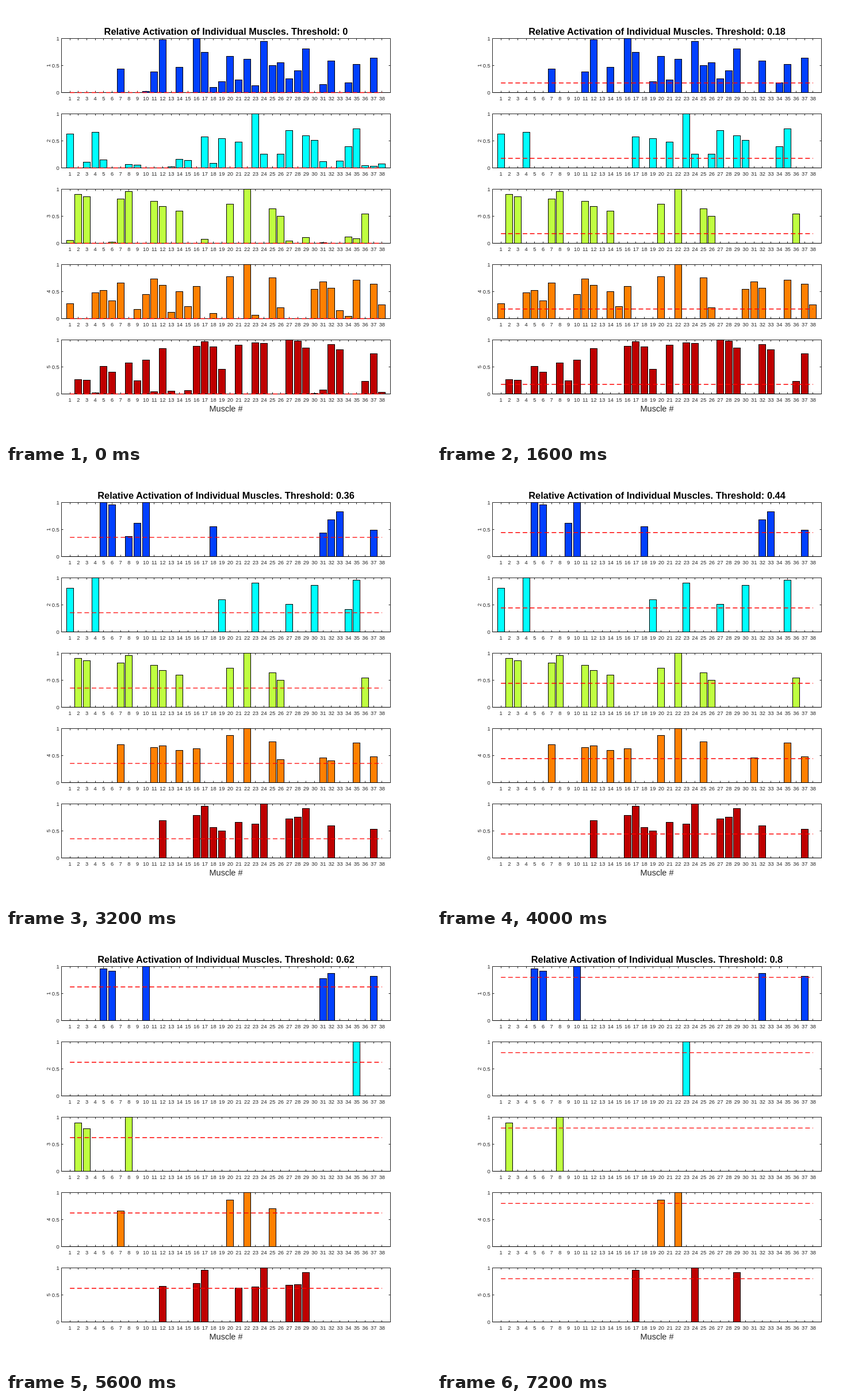
Recreate the animation shown at these times as an HTML page. Size 739 px wide and 758 px high, loop 8000 ms.

```html
<!DOCTYPE html>
<html lang="en">
<head>
<meta charset="utf-8">
<title>Muscle activation by threshold</title>
<style>
  html, body { margin: 0; width: 100%; height: 100%; overflow: hidden; background: #fff; }
  svg { display: block; width: 739px; height: 758px; font-family: Arial, "Liberation Sans", sans-serif; }
  text { fill: #262626; text-anchor: middle; font-size: 9.33px; }
  .title { fill: #000; font-size: 16.4px; font-weight: bold; }
  .axis { fill: none; stroke: #262626; }
  .bar { stroke: #000; }
  .limit { stroke: #f00; stroke-width: 1.35; stroke-dasharray: 8 4.6; }
  .step { visibility: hidden; animation: show 8s step-end infinite; }
  @keyframes show { 0% { visibility: visible; } 10%, 100% { visibility: hidden; } }
</style>
</head>
<body>
<svg id="stage" viewBox="0 0 739 758"></svg>
<script>
const STEPS = 10, MUSCLES = 38, LEFT = 96.5, WIDTH = 572, HEIGHT = 94;
const UNIT = WIDTH / (MUSCLES + 1);
const threshold = step => 0.8 * step / (STEPS - 1);
const panelTop = panel => 56.5 + 131 * panel;
const panelBase = panel => panelTop(panel) + HEIGHT;
const muscleX = muscle => LEFT + muscle * UNIT;
const crisp = v => Math.floor(v) + 0.5;

// Muscles ranked by strength; activation rises evenly from low to high.
const ramp = (low, high, muscles) => Object.fromEntries(
  muscles.map((m, i) => [m, low + (high - low) * i / (muscles.length - 1)]));

const cyanCore = ramp(0.81, 1, [1, 30, 23, 35, 4]);

// "wide" is the broad solution; "sparse" holds the others by the step they begin at.
const panels = [
  {
    color: '#0040ff',
    wide: {
      10: 0.02, 17: 0.74, 29: 0.81,
      ...ramp(0.1, 0.26, [18, 23, 31, 34, 19, 21, 27]),
      ...ramp(0.38, 0.67, [11, 28, 7, 14, 25, 35, 26, 32, 22, 37, 20]),
      ...ramp(0.95, 1, [24, 12, 16])
    },
    sparse: {
      1: {
        ...ramp(0.13, 0.55, [1, 11, 3, 36, 13, 2, 21, 27, 37, 15, 38, 31, 32, 8, 23, 30, 9, 18, 4]),
        ...ramp(0.82, 1, [33, 10, 6, 5])
      },
      4: { ...ramp(0.37, 0.68, [8, 31, 37, 18, 9, 32]), 33: 0.83, 6: 0.96, 10: 1, 5: 1 },
      6: ramp(0.59, 1, [33, 10, 31, 23, 6, 30, 4, 5]),
      7: ramp(0.78, 1, [31, 37, 32, 6, 5, 10])
    }
  },
  {
    color: '#00ffff',
    wide: {
      ...ramp(0.02, 0.16, [13, 37, 36, 9, 8, 38, 18, 3, 31, 33, 15, 5, 14]),
      24: 0.26, 26: 0.26, 34: 0.39, 23: 1,
      ...ramp(0.48, 0.72, [21, 30, 19, 17, 29, 1, 4, 27, 35])
    },
    sparse: {
      1: {
        ...ramp(0.1, 0.12, [3, 31, 20, 12]),
        ...ramp(0.31, 0.78, [14, 24, 26, 21, 30, 34, 19, 1, 4, 27, 17, 29]),
        23: 0.97, 35: 1
      },
      4: { ...ramp(0.42, 0.6, [34, 27, 19]), ...cyanCore },
      6: ramp(0.64, 1, [28, 10, 12, 37, 32, 16]),
      7: { 35: 1 },
      8: cyanCore,
      9: { 23: 1 }
    }
  },
  {
    color: '#bfff40',
    wide: {
      ...ramp(0.01, 0.12, [31, 6, 27, 1, 17, 35, 29, 34]),
      ...ramp(0.5, 1, [26, 36, 14, 25, 12, 20, 11, 7, 3, 2, 8, 22])
    },
    sparse: { 6: ramp(0.79, 1, [3, 2, 8]) }
  },
  {
    color: '#ff8000',
    wide: {
      ...ramp(0.04, 0.28, [34, 23, 18, 13, 33, 9, 26, 15, 38, 1]),
      ...ramp(0.45, 0.78, [10, 4, 14, 5, 30, 32, 16, 12, 37, 7, 31, 35, 11, 25, 20]),
      6: 0.33, 22: 1
    },
    sparse: {
      1: {
        ...ramp(0.09, 0.25, [38, 29, 10, 34, 24, 1, 4, 30]),
        ...ramp(0.4, 0.48, [32, 26, 31, 37]),
        ...ramp(0.6, 0.76, [14, 16, 11, 12, 7, 35, 25]),
        20: 0.87, 22: 1
      },
      7: { 7: 0.66, 25: 0.7, 20: 0.86, 22: 1 }
    }
  },
  {
    color: '#bf0000',
    wide: {
      ...ramp(0.01, 0.07, [30, 4, 38, 11, 13, 15, 31]),
      ...ramp(0.23, 0.265, [36, 9, 3, 2]),
      ...ramp(0.4, 0.63, [6, 19, 5, 8, 10]),
      ...ramp(0.82, 1, [33, 12, 29, 18, 16, 21, 32, 24, 23, 17, 28, 27]),
      37: 0.75
    },
    sparse: {
      1: {
        ...ramp(0.17, 0.34, [26, 8, 10, 33]),
        ...ramp(0.5, 0.79, [19, 37, 18, 32, 23, 21, 12, 27, 28, 16]),
        ...ramp(0.92, 1, [29, 17, 24])
      },
      6: ramp(0.6, 1, [24, 19, 21, 27, 29, 17, 23]),
      7: { ...ramp(0.63, 0.71, [21, 23, 12, 27, 28, 16]), ...ramp(0.92, 1, [29, 17, 24]) }
    }
  }
];

function activeBars({ wide, sparse }, step) {
  const start = Object.keys(sparse).filter(s => s <= step).pop();
  const isWide = [0, 2, 3].includes(step) || start === undefined;
  return Object.entries(isWide ? wide : sparse[start])
    .filter(([, value]) => value > threshold(step));
}

function add(parent, tag, attrs, content = '') {
  const node = document.createElementNS('http://www.w3.org/2000/svg', tag);
  for (const key in attrs) node.setAttribute(key, attrs[key]);
  node.textContent = content;
  return parent.appendChild(node);
}
const stage = document.getElementById('stage');

function drawAxes(panel) {
  const y0 = panelTop(panel), y1 = panelBase(panel), right = LEFT + WIDTH;
  let path = `M${LEFT} ${y0}H${right}V${y1}H${LEFT}Z`;
  for (let m = 1; m <= MUSCLES; m++) {
    const x = crisp(muscleX(m));
    path += `M${x} ${y0}v3M${x} ${y1}v-3`;
    add(stage, 'text', { x: muscleX(m), y: y1 + 13.8 }, m);
  }
  for (const v of [0, 0.5, 1]) {
    const y = y1 - v * HEIGHT;
    path += `M${LEFT} ${crisp(y)}h3M${right} ${crisp(y)}h-3`;
    add(stage, 'text', { x: 92.8, y: y + 3.8, style: 'text-anchor:end' }, v);
  }
  add(stage, 'path', { class: 'axis', d: path });
  add(stage, 'text', { transform: `translate(76.5 ${y0 + HEIGHT / 2}) rotate(-90)` }, panel + 1);
}

function drawStep(step) {
  const group = add(stage, 'g', { class: 'step', style: `animation-delay:${step * 800}ms` });
  const level = threshold(step);
  add(group, 'text', { class: 'title', x: 382.5, y: 50 },
    `Relative Activation of Individual Muscles. Threshold: ${+level.toFixed(2)}`);
  panels.forEach((panel, index) => {
    const base = panelBase(index);
    for (const [muscle, value] of activeBars(panel, step)) {
      const x = crisp(muscleX(+muscle) - 0.4 * UNIT);
      const y = crisp(base - value * HEIGHT);
      const width = crisp(muscleX(+muscle) + 0.4 * UNIT) - x;
      add(group, 'rect', { class: 'bar', x, y, width, height: base - y, fill: panel.color });
    }
    add(group, 'path', { class: 'bar', d: `M${LEFT} ${base}h${WIDTH}` });
    const y = base - level * HEIGHT;
    add(group, 'line', { class: 'limit', x1: muscleX(1), x2: muscleX(MUSCLES), y1: y, y2: y });
  });
}

panels.forEach((_, index) => drawAxes(index));
add(stage, 'text', { x: 382.5, y: 705, style: 'font-size:14.5px' }, 'Muscle #');
for (let step = 0; step < STEPS; step++) drawStep(step);
</script>
</body>
</html>
```
